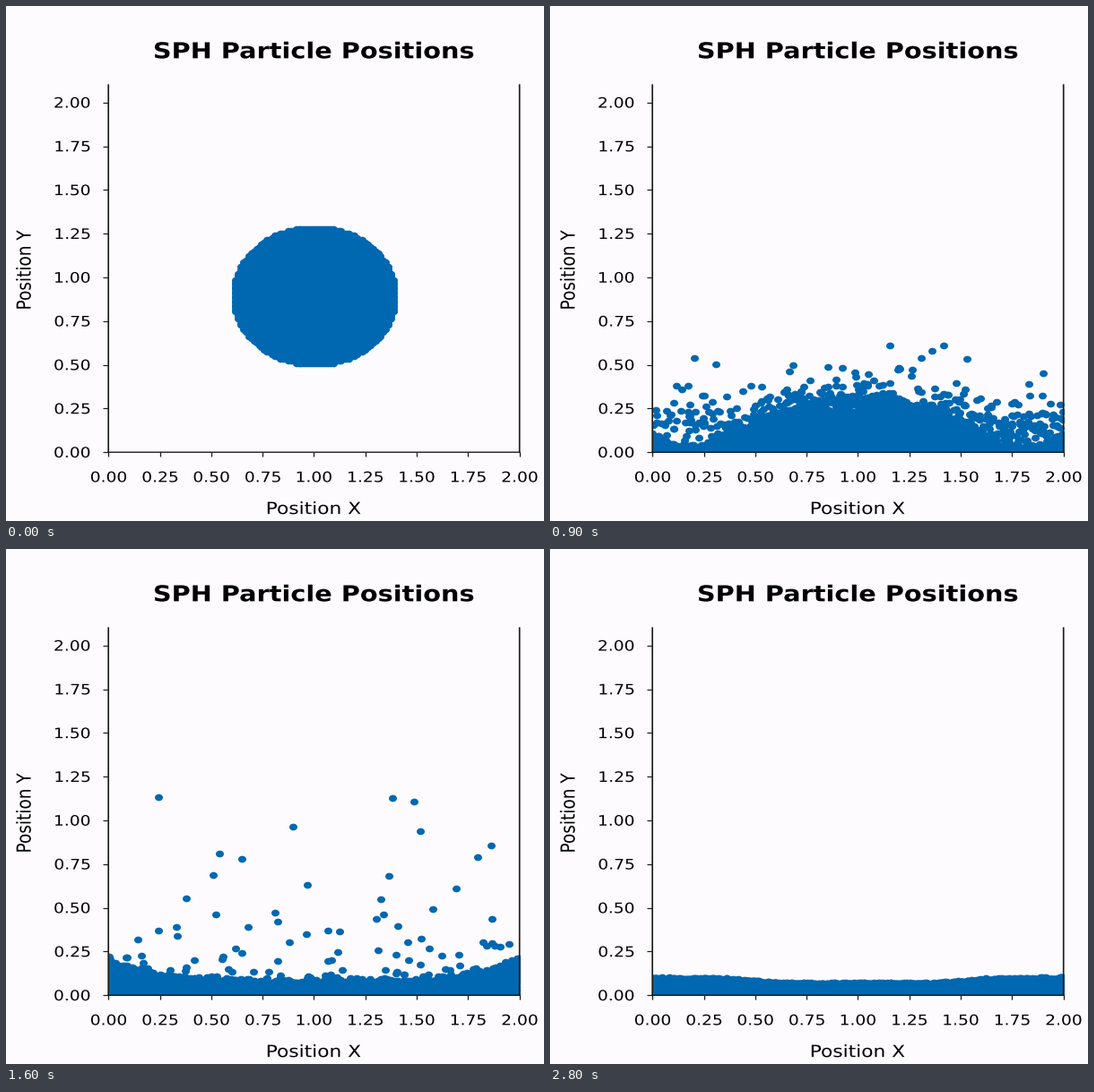
Write a matplotlib script that moves like this. It is 600 px wide and 575 px high and loops after 2900 ms.

```python
import numpy as np
import matplotlib.pyplot as plt
from matplotlib.animation import FuncAnimation
from matplotlib.patches import PathPatch
from matplotlib.path import Path
from matplotlib.textpath import TextPath
from matplotlib.transforms import Affine2D

W, H, DPI = 600, 575, 100
FRAMES, INTERVAL = 29, 100
LEFT, RIGHT, TOP, BOTTOM = 114.2, 572.7, 88.2, 498.2
X_MAX, Y_MAX = 2.0, 2.1
PAPER, INK, WATER = "#fdfbfe", "#000000", "#0068b1"
AXIS = "#1c1c1c"
PT = 72 / DPI
# The whole picture is wider than equal axes would make it.
STRETCH = ((RIGHT - LEFT) / X_MAX) / ((BOTTOM - TOP) / Y_MAX)

rng = np.random.default_rng(7)

# --- The falling disc -------------------------------------------------
STEP, RADIUS = 0.0128, 0.396
IMPACT, SETTLED = 3, 7
steps = np.arange(-31, 32) * STEP
gx, gy = (a.ravel() for a in np.meshgrid(steps, steps))
inside = np.hypot(gx, gy) < RADIUS
disc_x, disc_y = 1.003 + gx[inside], 0.894 + gy[inside]
COUNT = disc_x.size

# A few grains squirt out sideways when the disc lands.
spill = (disc_y < 0.7) & (rng.random(COUNT) < 0.04)
spill_x = 1 + np.sign(disc_x - 1) * (0.4 + 0.17 * rng.random(COUNT) ** 1.6)
spill_y = 0.05 * rng.random(COUNT) ** 3


def disc(n):
    x = disc_x
    y = disc_y - 0.857 * (n / IMPACT) ** 1.65
    if n == IMPACT:
        x = np.where(spill, spill_x, x)
        y = np.where(spill, spill_y, y)
    return x, np.maximum(y, 0.004)


# --- The pool: a mound, waves at the walls and a level base -----------
GRID = np.linspace(0, X_MAX, 400)
FROM_WALL = np.minimum(GRID, X_MAX - GRID)
FROM_MID = np.abs(GRID - X_MAX / 2)


def key(n, *values):
    """A value moving between splash, peak, collapse, backwash and rest."""
    return np.interp(n, [SETTLED, 11, 16, 20, 28], values)


def surface(n):
    width = key(n, 0.56, 0.62, 0.62, 0.62, 0.62)
    power = key(n, 4, 2.2, 2.2, 2.2, 2.2)
    mound = key(n, 0.25, 0.32, 0, 0, 0) * np.exp(-(FROM_MID / width) ** power)
    reach = key(n, 0.07, 0.07, 0.18, 0.05, 0.05)
    wall = key(n, 0.01, 0.2, 0.13, 0.04, 0.005) * np.exp(-FROM_WALL / reach)
    shoulder = key(n, 0, 0, 0, 0.03, 0.014) * (
        1 - np.tanh((FROM_WALL - 0.48) / 0.12))
    return key(n, 0.012, 0.03, 0.075, 0.048, 0.073) + mound + wall + shoulder


# Each particle keeps its share of the volume and its relative depth.
order = np.argsort(np.argsort(disc_x + rng.normal(0, 0.01, COUNT)))
share = (order + 0.5) / COUNT
depth = rng.random(COUNT)
depth[rng.random(COUNT) < 0.06] = 0.02
sinking = rng.random(COUNT) < 0.42
loose = np.where(rng.random(COUNT) < 0.13, rng.exponential(1, COUNT), 0)
depth[loose > 0] = 0.92


def pool(n):
    h = surface(n)
    volume = np.cumsum(h)
    x = np.interp(share, volume / volume[-1], GRID)
    sunk = 1 - sinking * key(n, 0, 0.95, 0, 0, 0)
    scatter = key(n, 0.045, 0.065, 0.012, 0.005, 0)
    return x, np.interp(x, GRID, h) * depth * sunk + loose * scatter


# --- Drops thrown up from the floor -----------------------------------
GRAVITY = 0.68


def throw(count, first, last, speed):
    """Start time, x, sideways speed and upward speed of some drops."""
    return np.array([rng.uniform(first, last, count),
                     rng.uniform(0.01, 1.99, count),
                     rng.normal(0, 0.07, count),
                     speed])


SPLASH, BACKWASH = 340, 45
fast = np.minimum(0.45 + rng.exponential(0.15, SPLASH), 1.24)
DROPS = np.hstack([throw(SPLASH, -1.1, -0.5, fast),
                   throw(BACKWASH, 0.9, 1.5, rng.uniform(0.35, 0.58, BACKWASH))])


def flight_time(n):
    """The simulation runs slower while the water moves fast."""
    return np.interp(n, [0, 7, 11, 16, 20, 28], [-1.76, -0.64, 0, 1, 2, 4])


def drops(n):
    start, x, vx, vy = DROPS
    t = flight_time(n) - start
    x = np.abs(x + vx * t)
    x = X_MAX - np.abs(X_MAX - x)
    return x, vy * t - GRAVITY * t**2 / 2


def particles(n):
    if n <= IMPACT:
        return disc(n)
    if n < SETTLED:
        w = (n - IMPACT) / (SETTLED - IMPACT)
        (x0, y0), (x1, y1) = disc(IMPACT), pool(SETTLED)
        x = x0 + (x1 - x0) * (1 - (1 - w) ** 2)
        y = (y0 + (y1 - y0) * w) * (1 - 0.45 * np.sin(np.pi * w))
    else:
        x, y = pool(n)
    dx, dy = drops(n)
    return np.append(x, dx), np.append(y, dy)


# --- Stage ------------------------------------------------------------
fig = plt.figure(figsize=(W / DPI, H / DPI), dpi=DPI, facecolor=PAPER)
ax = fig.add_axes([LEFT / W, 1 - BOTTOM / H,
                   (RIGHT - LEFT) / W, (BOTTOM - TOP) / H], facecolor=PAPER)
ax.set(xlim=(0, X_MAX), ylim=(0, Y_MAX))
ticks = np.linspace(0, 2, 9)
ax.set_xticks(ticks, [])
ax.set_yticks(ticks, [])
ax.tick_params(axis="x", length=4.9 * PT, width=1.3 * PT, color=AXIS)
ax.tick_params(axis="y", length=5.8 * PT, width=1.2 * PT, color=AXIS)
ax.spines["top"].set_visible(False)
for side, width in (("left", 1.7), ("right", 1.7), ("bottom", 1.4)):
    ax.spines[side].set(linewidth=width * PT, color=AXIS, snap=False)


def label(text, x, y, size, weight="normal", ha=0.5, turn=0):
    """Text at a pixel place, y being the middle of the capitals."""
    path = TextPath((0, 0), text, size=size,
                    prop={"family": "DejaVu Sans", "weight": weight})
    box = path.get_extents()
    place = (Affine2D()
             .translate(-(box.x0 + ha * box.width), -0.365 * size)
             .rotate_deg(turn).scale(STRETCH, 1)
             .translate(x, H - y).scale(1 / DPI))
    fig.add_artist(PathPatch(path, facecolor=INK, linewidth=0,
                             transform=place + fig.dpi_scale_trans))


label("SPH Particle Positions", 343.6, 49.4, 24.5, weight="bold")
label("Position X", 343.6, 560.4, 18.5)
label("Position Y", 19.6, 294, 18.5, turn=90)
for v in ticks:
    label(f"{v:.2f}", LEFT + v * (RIGHT - LEFT) / X_MAX + 0.3, 525.6, 15.9)
    label(f"{v:.2f}", 93.3, BOTTOM - v * (BOTTOM - TOP) / Y_MAX, 15.9, ha=1)

oval = Path.unit_circle().transformed(Affine2D().scale(STRETCH, 1))
dots, = ax.plot([], [], linestyle="none", marker=oval, markersize=9 * PT,
                color=WATER, markeredgewidth=0)


def draw(n):
    dots.set_data(*particles(n))
    return dots,


anim = FuncAnimation(fig, draw, frames=FRAMES, interval=INTERVAL, repeat=True)
plt.show()
```
